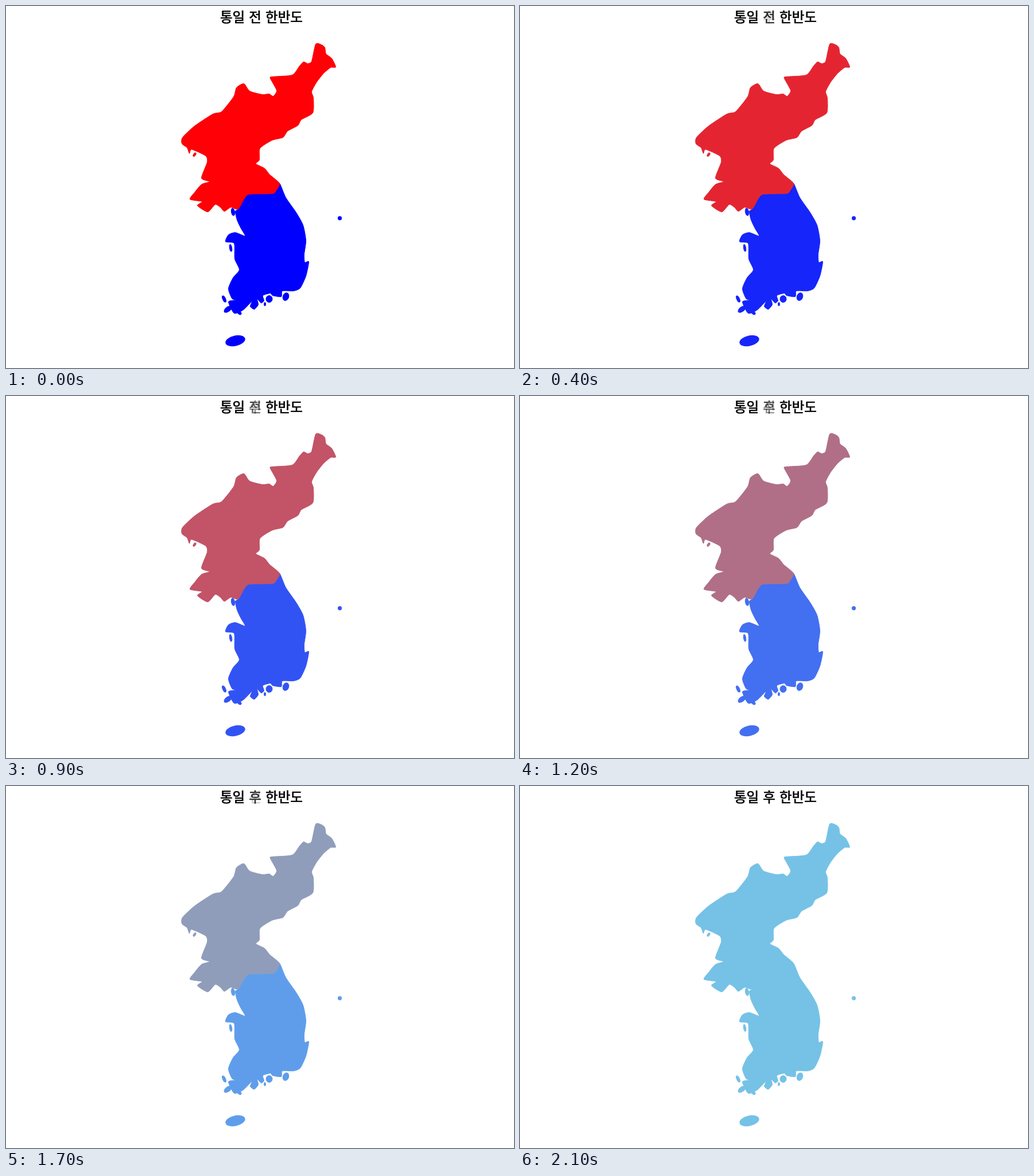
An HTML page that plays this animation: 885 px wide and 632 px high, repeating every 2200 ms.

```html
<!DOCTYPE html>
<html lang="ko">
<head>
<meta charset="utf-8">
<title>통일 한반도</title>
<style>
  html, body { margin: 0; width: 100%; height: 100%; overflow: hidden; background: #fff; }
  svg { display: block; width: 885px; height: 632px; stroke-linejoin: round; }
  text {
    font: 400 23.5px "Noto Sans CJK KR", "Noto Sans CJK", "Noto Sans KR", sans-serif;
    text-anchor: middle; stroke: #000; stroke-width: .7px;
  }
</style>
</head>
<body>
<svg viewBox="0 0 885 632">
  <g transform="translate(.5 .5)">
    <g id="south"></g>
    <g id="north"></g>
  </g>
  <text x="394.5" y="27.5">통일</text>
  <text x="434" y="27.5" id="before">전</text>
  <text x="434" y="27.5" id="after">후</text>
  <text x="484.5" y="27.5">한반도</text>
</svg>
<script>
const $ = id => document.getElementById(id);
const points = text => text.trim().split(/\s+/).map(p => p.split(",").map(Number));

// Key points of the coast, clockwise; a spline rounds them off
const northEast = points(`539,66 549,67 555,72 557,83 567,91 574,106 565,107 553,117 541,132
  532,149 535,160 534,186 514,198 508,208 490,218 482,229 463,234 442,248 441,268 435,275
  450,283 459,294 476,309`);
const border = points(`470,322 463,327 424,328 415,335 404,354`);
const northWest = points(`391,351 380,358 373,351 364,346 351,359 333,348 341,341 320,337
  328,325 340,311 354,306 340,300 350,272 347,261 323,250 319,257 315,247 306,240 307,229
  328,209 360,188 375,184 396,158 401,142 414,135 424,148 446,154 458,153 465,157 471,147
  460,126 463,123 498,120 511,104 518,97 525,100 532,96`);
const southCoast = points(`476,309 487,334 505,360 517,382 522,409 519,433 520,447 527,446
  522,471 512,492 500,497 481,497 479,507 464,505 460,501 447,505 449,514 444,518 437,511
  439,521 432,529 425,524 428,515 413,530 397,536 387,516 399,513 393,510 387,493 395,474
  406,460 398,441 397,414 382,411 387,399 399,395 416,401 409,388 402,373 399,358`);

function add(parent, tag, attrs) {
  const el = document.createElementNS("http://www.w3.org/2000/svg", tag);
  for (const name in attrs) el.setAttribute(name, attrs[name]);
  $(parent).append(el);
}

// Closed cardinal spline through the points
function land(parent, pts, pull = 1 / 9) {
  const at = i => pts[(i + pts.length) % pts.length];
  const handle = (i, dir) => at(i).map((v, c) => v + dir * pull * (at(i + 1)[c] - at(i - 1)[c]));
  const curves = pts.map((_, i) => `C${handle(i, 1)} ${handle(i + 1, -1)} ${at(i + 1)}`);
  add(parent, "path", { d: `M${pts[0]}${curves.join("")}Z` });
}

function isle(parent, cx, cy, rx, ry, turn = 0) {
  add(parent, "ellipse", { cx, cy, rx, ry, transform: `rotate(${turn} ${cx} ${cy})` });
}

land("north", [...northEast, ...border, ...northWest]);
land("south", [...southCoast, ...border.slice().reverse()]);

isle("north", 328, 259, 1.8, 3.5, 35);
isle("south", 399, 584, 17, 8.5, -13);
isle("south", 379.5, 511, 2.5, 6, -25);
isle("south", 386, 529, 7.5, 4, -38);
isle("south", 406, 535, 4, 2.5, 40);
isle("south", 487, 507, 5, 7, 20);
isle("south", 458, 511, 5.5, 6);
isle("south", 450.5, 520, 1.5, 3);
isle("south", 391, 422, 2, 6, -10);
isle("south", 395, 359, 3, 6.5, -10);
isle("south", 581, 370, 3.2, 3.2);

// How long each step is held, in tenths of a second
const holds = [2, 2, 2, 1, 2, 1, 2, 1, 1, 1, 2, 2, 2, 1];
const LOOP = 2200, END = 2100;
const red = [254, 0, 6], blue = [0, 0, 255], sky = [117, 194, 230];

const mix = (a, b, k) => `rgb(${a.map((v, i) => Math.round(v + (b[i] - v) * k))})`;

function stepStart(t) {
  let start = 0;
  for (const hold of holds) {
    if (t < start + hold * 100) break;
    start += hold * 100;
  }
  return start;
}

function paint(id, color) {
  $(id).setAttribute("fill", color);
  $(id).setAttribute("stroke", color);
}

function draw(time) {
  const k = stepStart(time % LOOP) / END;
  paint("north", mix(red, sky, k));
  paint("south", mix(blue, sky, k));
  $("before").setAttribute("opacity", 1 - k);
  $("after").setAttribute("opacity", k);
}

const start = performance.now();
function tick() {
  draw(performance.now() - start);
  requestAnimationFrame(tick);
}
tick();
</script>
</body>
</html>
```
